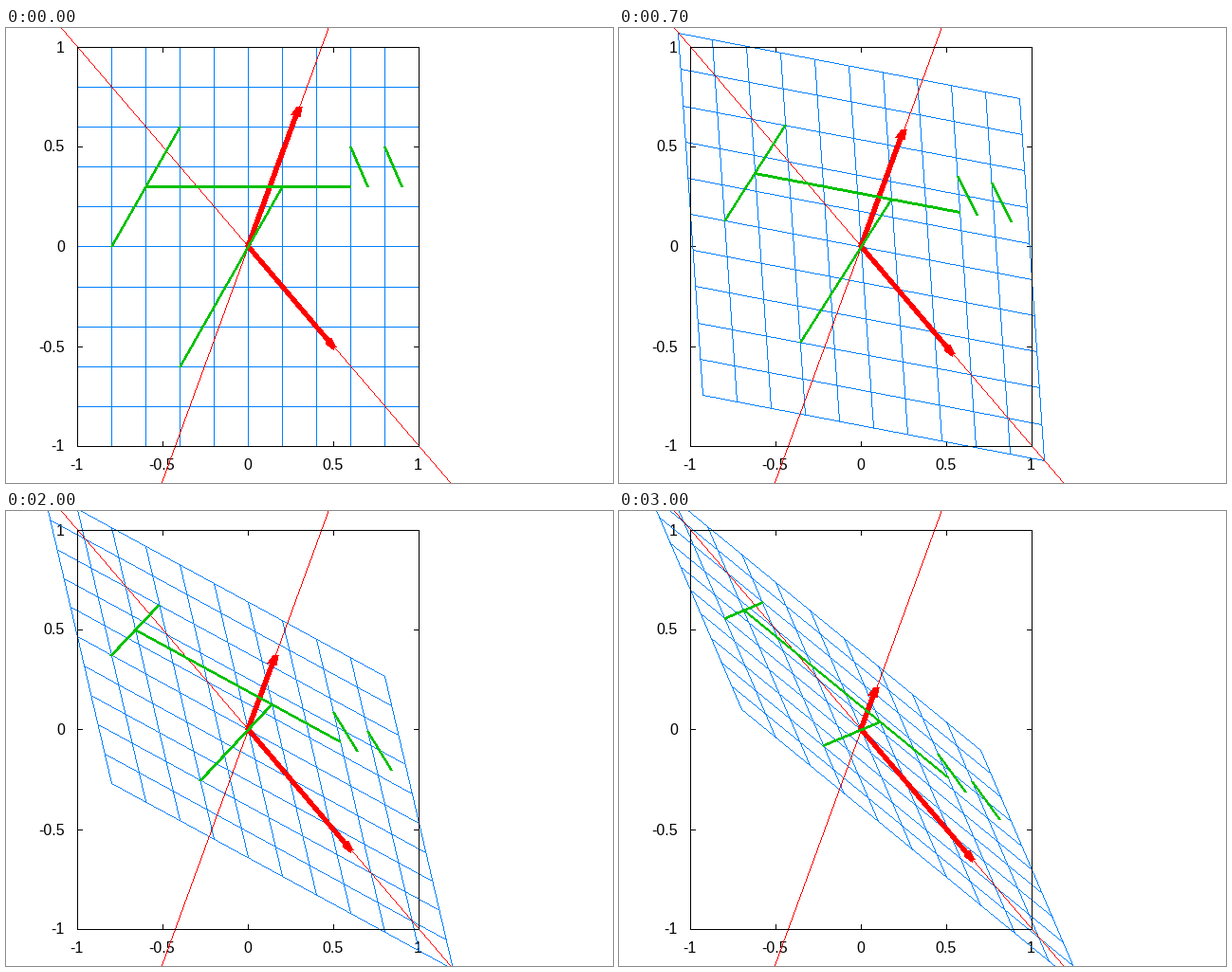
Write a matplotlib script that moves like this. It is 640 px wide and 480 px high and loops after 3100 ms.

```python
import numpy as np
import matplotlib.pyplot as plt
from matplotlib.animation import FuncAnimation

W, H = 640, 480
FRAMES, INTERVAL = 31, 100

RED = (255, 0, 0, 255)
GREEN = (0, 192, 0, 255)
BLUE = (0, 128, 255, 255)
BLACK = (0, 0, 0, 255)

V1 = np.array([0.3, 0.7])
V2 = np.array([0.5, -0.5])
BASIS = np.column_stack([V1, V2])
UNBASIS = np.linalg.inv(BASIS)
END_SCALE = np.array([0.3, 1.3])

FIGURE = [
    ((-0.8, 0.0), (-0.4, 0.6)),
    ((-0.6, 0.3), (0.6, 0.3)),
    ((-0.4, -0.6), (0.2, 0.3)),
    ((0.6, 0.5), (0.7, 0.3)),
    ((0.8, 0.5), (0.9, 0.3)),
]
TICKS = (-1, -0.5, 0, 0.5, 1)


def to_px(p):
    """Plot coordinates to whole stage pixels."""
    x = np.floor(75 + (p[0] + 1) * 180 + 0.5)
    y = 479 - np.floor(38 + (p[1] + 1) * 210.5 + 0.5)
    return np.array([x, y])


def draw_line(img, p, q, color, thick=1):
    """Hard-edged line built from spans across its main direction."""
    (dx, dy) = np.abs(np.subtract(q, p))
    main = 0 if dx >= dy else 1
    if p[main] > q[main]:
        p, q = q, p
    length = max(dx, dy)
    if length == 0:
        return
    span = max(1, int(thick * np.hypot(dx, dy) / length))
    a = np.arange(np.floor(p[main] + 0.5), np.floor(q[main] + 0.5) + 1)
    b = np.interp(a, [p[main], q[main]], [p[1 - main], q[1 - main]])
    a = a.astype(int)
    b = np.floor(b + 0.5).astype(int)
    for k in range(span):
        c = b - span // 2 + k
        x, y = (a, c) if main == 0 else (c, a)
        ok = (x >= 0) & (x < W) & (y >= 0) & (y < H)
        img[y[ok], x[ok]] = color


def draw_arrow(img, p, q, color, thick, head=10, angle=np.radians(15)):
    draw_line(img, p, q, color, thick)
    back = (p - q) / np.hypot(*(p - q)) * head
    for s in (angle, -angle):
        c, d = np.cos(s), np.sin(s)
        wing = q + np.array([c * back[0] - d * back[1],
                             d * back[0] + c * back[1]])
        draw_line(img, q, np.floor(wing + 0.5), color, thick)


def draw_frame(i):
    t = i / (FRAMES - 1)
    scale = 1 + (END_SCALE - 1) * t
    matrix = BASIS @ np.diag(scale) @ UNBASIS
    img = np.zeros((H, W, 4), np.uint8)

    def place(p):
        return to_px(matrix @ np.array(p))

    for g in np.linspace(-1, 1, 11):
        draw_line(img, place((-1, g)), place((1, g)), BLUE)
        draw_line(img, place((g, -1)), place((g, 1)), BLUE)

    for v in (V1, V2):
        draw_line(img, to_px(-4 * v), to_px(4 * v), RED)
    for v in (V1, V2):
        draw_arrow(img, to_px((0, 0)), place(v), RED, 6)
    for p, q in FIGURE:
        draw_line(img, place(p), place(q), GREEN, 3)

    corners = [to_px(c) for c in ((-1, -1), (1, -1), (1, 1), (-1, 1))]
    for p, q in zip(corners, corners[1:] + corners[:1]):
        draw_line(img, p, q, BLACK)
    return img


def draw_axes(ax):
    """Tick marks and labels, which lie under the moving lines."""
    marks = np.zeros((H, W, 4), np.uint8)
    font = dict(family="Liberation Sans", size=11.52, color="black",
                va="baseline")
    for v in TICKS:
        x, y = to_px((v, v))
        for a, b in (((x, 20), (x, 25)), ((x, 436), (x, 441)),
                     ((75, y), (80, y)), ((430, y), (435, y))):
            draw_line(marks, a, b, BLACK)
        ax.text(x - 0.5, 465.5, f"{v:g}", ha="center", **font)
        ax.text(62, y + 5.5, f"{v:g}", ha="right", **font)
    show(ax, marks, 1)


def show(ax, img, z):
    return ax.imshow(img, extent=(0, W, H, 0), interpolation="nearest",
                     aspect="auto", zorder=z)


fig = plt.figure(figsize=(W / 100, H / 100), dpi=100, facecolor="white")
ax = fig.add_axes([0, 0, 1, 1])
ax.axis("off")
draw_axes(ax)
layer = show(ax, draw_frame(0), 5)
ax.set_xlim(0, W)
ax.set_ylim(H, 0)


def update(i):
    layer.set_data(draw_frame(i))
    return (layer,)


anim = FuncAnimation(fig, update, frames=FRAMES, interval=INTERVAL,
                     repeat=True, repeat_delay=0)
plt.show()
```
